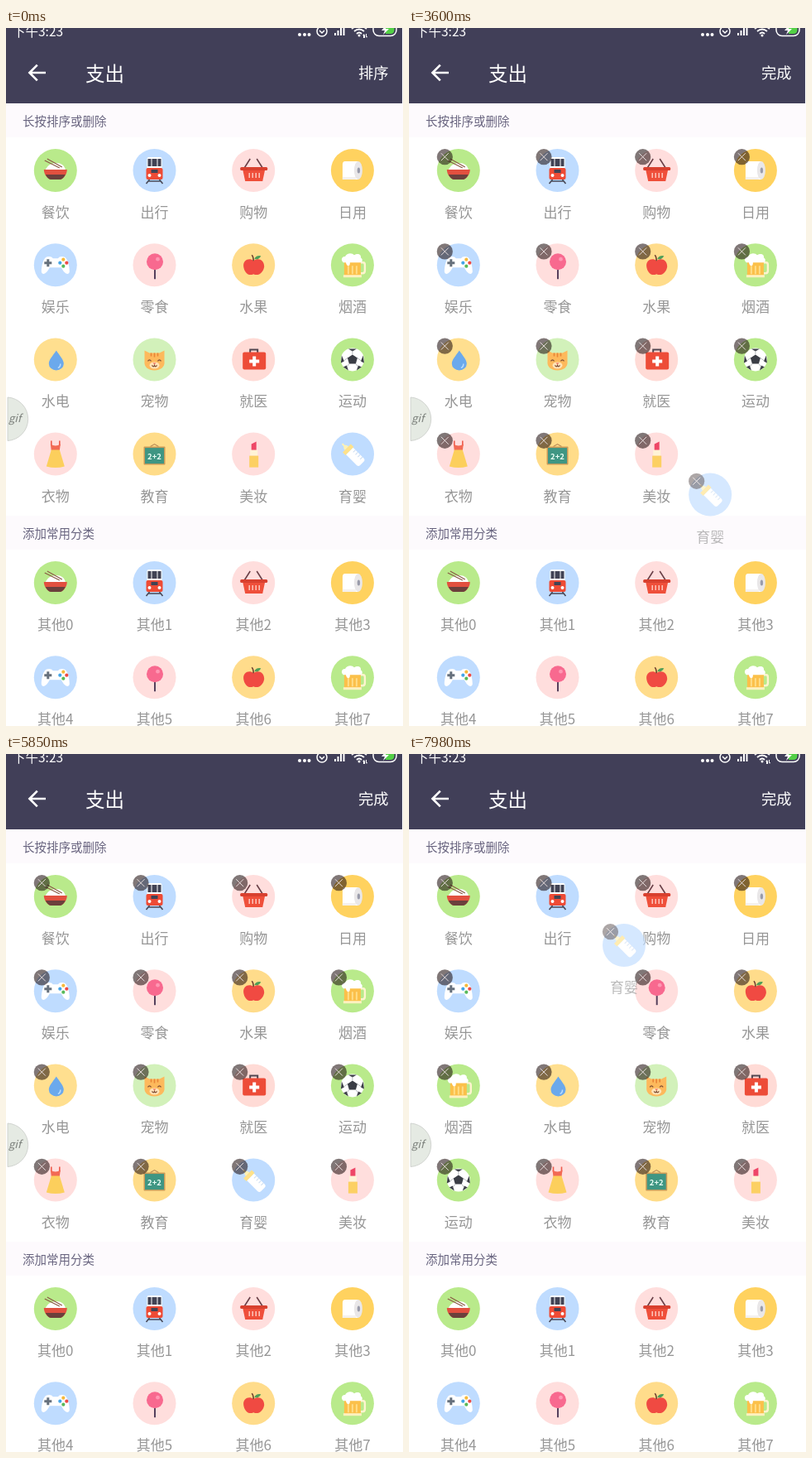
Write an HTML page that moves like this. It is 480 by 843 pixels and loops after 8000 ms.

```html
<!DOCTYPE html>
<html lang="zh-CN">
<head>
<meta charset="utf-8">
<title>支出分类</title>
<style>
html, body { margin: 0; width: 100%; height: 100%; overflow: hidden; background: #fff; }
svg { display: block; width: 100%; height: 100%; }
text { font-family: "Noto Sans CJK SC", "Noto Sans CJK", "Noto Sans", sans-serif; }
.label { font-size: 17px; fill: #969696; text-anchor: middle; }
.head { font-size: 14.5px; fill: #68647f; }
.bar { fill: #fff; }
</style>
</head>
<body>
<svg id="stage" viewBox="0 0 480 843" preserveAspectRatio="none"></svg>
<script>
const LOOP = 8000, SHIFT = 250, LAST = 15;

const GREEN = '#b9ea8b', BLUE = '#bfdcff', PINK = '#ffdedd', AMBER = '#ffdc8b';

// Each icon: disc colour and artwork centred on 0,0
const icons = {
  bowl: [GREEN, `
    <path d="M-12-1C-9-7-4-9 1-9 7-9 11-6 12-1Z" fill="#fff"/>
    <path d="M-13-12 5-3M-10-14 8-4" stroke="#8a5a44" stroke-width="1.2"/>
    <path d="M-14-1H14C14 5 9 11 5 11H-5C-9 11-14 5-14-1Z" fill="#e2503f"/>
    <path d="M-12 5H12Q9 11 5 11H-5Q-9 11-12 5Z" fill="#6b403c"/>`],
  train: [BLUE, `
    <path d="M-6 11-10 16M6 11 10 16M-7 13H7" stroke="#4a4a58" stroke-width="1.6"/>
    <rect x="-9" y="-16" width="18" height="16" rx="2" fill="#fff"/>
    <path d="M-8-14H-4V-5H-8ZM-3-14H3V-5H-3ZM4-14H8V-5H4Z" fill="#414354"/>
    <rect x="-10" y="-3" width="20" height="14" rx="2" fill="#ee4b35"/>
    <path d="M-4-1H4V3H-4Z" fill="#414354"/>
    <circle cx="-6" cy="6" r="2" fill="#fff"/><circle cx="6" cy="6" r="2" fill="#fff"/>`],
  basket: [PINK, `
    <path d="M-11-3-4-14M11-3 4-14" stroke="#6a4048" stroke-width="1.6"/>
    <path d="M-13-1H14L11 13H-10Z" fill="#ef4f3a"/>
    <rect x="-16" y="-4" width="33" height="4" rx="1.5" fill="#d8402f"/>
    <path d="M-5 3V9M-1 3V9M3 3V9M7 3V9" stroke="#ffd8d0" stroke-width="1.3"/>`],
  roll: ['#ffd25f', `
    <path d="M-9-11H7V11H-12V-7Q-12-11-9-11Z" fill="#fff"/>
    <path d="M-12 8V11H4V8Z" fill="#f4f1ee"/>
    <ellipse cx="7" cy="0" rx="5" ry="11" fill="#e9e7e8"/>
    <ellipse cx="7.5" cy="0" rx="1.7" ry="3.6" fill="#9a9cab"/>`],
  pad: [BLUE, `
    <path d="M-10-10Q-5-11-3-8H3Q5-11 10-10C15-9 17 2 17 8 16 13 11 11 7 3H-7C-11 11-16 13-17 8-17 2-15-9-10-10Z" fill="#fff"/>
    <path d="M-9-7V2M-13.5-2.5H-4.5" stroke="#66707c" stroke-width="3"/>
    <circle cx="9.5" cy="-6.5" r="2.1" fill="#f6b93b"/><circle cx="5.5" cy="-2.5" r="2.1" fill="#43a5e8"/>
    <circle cx="13.5" cy="-2.5" r="2.1" fill="#ee4b45"/><circle cx="9.5" cy="1.5" r="2.1" fill="#58b95b"/>`],
  candy: [PINK, `
    <path d="M.5 4V17" stroke="#55405c" stroke-width="2"/>
    <circle cx=".5" cy="-4" r="10" fill="#f8698f"/>
    <circle cx="4" cy="-7" r="2.4" fill="#ff97b3"/>`],
  apple: [AMBER, `
    <path d="M0-5C-4-9-13-7-12 2-11 9-6 14 0 11 6 14 12 9 13 2 13-7 5-9 0-5Z" fill="#f04a42"/>
    <path d="M0-5Q0-10-2-12" fill="none" stroke="#704030" stroke-width="1.6"/>
    <path d="M1-7Q3-12 9-11 7-6 1-7Z" fill="#4f9e57"/>`],
  beer: [GREEN, `
    <path d="M10-3H13Q15-3 15 0V7Q15 10 12 10H10" fill="none" stroke="#fff4cf" stroke-width="2.4"/>
    <path d="M-10-5H10V13H-10Z" fill="#fbc04a"/>
    <path d="M-5 1V11M0 1V11M5 1V11" stroke="#ffdc85" stroke-width="2"/>
    <path d="M-11 12H11V15H-11Z" fill="#fff1c0"/>
    <path d="M-11-3C-15-6-12-11-9-10-7-15 0-15 2-12 7-15 11-12 10-9 14-6 11-2 8-3H-3Q-3 1-5 1T-8-3Z" fill="#fff"/>`],
  drop: ['#ffdf8f', `
    <path d="M1-11C5-5 10 0 10 5A9 8 0 0 1-8 5C-8 0-3-5 1-11Z" fill="#6ba9ec"/>
    <path d="M6 5Q6 9 3 10" fill="none" stroke="#b9dcff" stroke-width="1.5"/>`],
  cat: ['#d2f1ba', `
    <path d="M-12 2V-11L-6-8H6L12-11V2C13 9 7 13 0 13S-13 9-12 2Z" fill="#fdb95c"/>
    <path d="M0-8V-3M-4-8V-4M4-8V-4" stroke="#e88436" stroke-width="1.6"/>
    <ellipse cy="7" rx="6" ry="4" fill="#ffe3b8"/>
    <path d="M-8 2Q-6-1-4 2M4 2Q6-1 8 2M-3 7Q-1 10 0 7 1 10 3 7" fill="none" stroke="#7a4a33" stroke-width="1.2"/>
    <path d="M-2 4H2L0 6Z" fill="#ea6759"/>`],
  kit: ['#ffdbd6', `
    <path d="M-4-8V-12H5V-8" fill="none" stroke="#504650" stroke-width="2"/>
    <rect x="-13" y="-9" width="28" height="21" rx="2" fill="#ed4c38"/>
    <path d="M1-4V8M-5 2H7" stroke="#fff" stroke-width="4"/>`],
  ball: [GREEN, `
    <circle r="14" fill="#fff"/>
    <path d="M0-6 6-2 4 5H-4L-6-2ZM-5-13H5L0-10ZM13-5 14 4 10 2ZM-13-5-14 4-10 2ZM5 13 11 9 7 7ZM-5 13-11 9-7 7Z" fill="#3a3d45"/>
    <path d="M0-6V-11M6-2 11 2M4 5 7 9M-4 5-7 9M-6-2-11 2" stroke="#a4a7ad" stroke-width=".8"/>`],
  dress: [PINK, `
    <path d="M-5-16V-10M5-16V-10" stroke="#ee5a4c" stroke-width="1.6"/>
    <path d="M-6-12Q0-8 6-12L5-4H-5Z" fill="#f26a55"/>
    <path d="M-5-5H5L11 15Q0 18-11 15Z" fill="#fccf5c"/>`],
  board: ['#ffdc89', `
    <path d="M-5-9 0-12 5-9" fill="none" stroke="#b98a55" stroke-width="1.2"/>
    <rect x="-13" y="-9" width="26" height="22" rx="1" fill="#c99a58"/>
    <rect x="-11.5" y="-7.5" width="23" height="19" fill="#3f9683"/>
    <text y="6" font-size="9.5" font-weight="700" fill="#e9fff5" text-anchor="middle">2+2</text>`],
  lipstick: [PINK, `
    <path d="M-2.5-4V-12L3.5-15V-4Z" fill="#ee4767"/>
    <path d="M-4-5H5V2H-4Z" fill="#fff3d6"/>
    <path d="M-5 2H6V16H-5Z" fill="#fcd063"/>`],
  bottle: [BLUE, `
    <g transform="rotate(-45)">
      <path d="M-3-10Q-3-13-1-14V-17Q0-19 1-17V-14Q3-13 3-10Z" fill="#fff2b4"/>
      <path d="M-7-10H7V-5H-7Z" fill="#ffe28a"/>
      <path d="M-6-5H6V13Q6 16 3 16H-3Q-6 16-6 13Z" fill="#fff"/>
      <path d="M2-1H6M2 3H6M2 7H6M2 11H6" stroke="#cfdff2" stroke-width="1.1"/>
    </g>`]
};
const names = Object.keys(icons);
const labels = '餐饮 出行 购物 日用 娱乐 零食 水果 烟酒 水电 宠物 就医 运动 衣物 教育 美妆 育婴'.split(' ');

// Playback advances in short ticks: [start, tick length, tick count]
const spans = [[1400, 91.4, 7], [3400, 91.25, 8], [4220, 95.7, 8], [5090, 95, 8], [6450, 93.75, 8], [7300, 97.1, 7]];
// Free slot moves: [time, old slot, new slot]
const swaps = [[5450, 15, 14], [6990, 14, 10], [7267, 10, 5]];
// Times at which the network arrows blink off or on
const blinks = [2510, 3700, 4600, 5500];
// Finger path: [time, x, y]
const path = [
  [3310, 419, 514.6], [4130, 254, 662], [4600, 183, 757], [4700, 179, 757], [4889, 179, 711],
  [4985, 190, 657], [5600, 296, 522], [5800, 299.2, 514.6], [6480, 299.2, 514.6], [6640, 298, 500],
  [6990, 283, 400], [7200, 230, 270], [7300, 223, 232], [7590, 224, 205.5], [7979, 260, 231]
];

const slot = i => [59.8 + 119.7 * (i % 4), 172 + 114.2 * Math.floor(i / 4)];
const clamp = v => Math.max(0, Math.min(1, v));
const mix = (a, b, k) => a + (b - a) * k;
const ease = k => (1 - Math.cos(Math.PI * clamp(k))) / 2;
const at = ([x, y]) => `translate(${x.toFixed(2)} ${y.toFixed(2)})`;

const cell = (icon, label, extra = '') => `<circle r="26" fill="${icons[icon][0]}"/>${icons[icon][1]}${extra}
  <text class="label" y="57">${label}</text>`;
const badge = `<g class="badge" transform="translate(-16.5 -16.3)">
  <circle r="9.6" fill="#1c0d0d" fill-opacity=".56"/>
  <path d="M-4.5-4.5 4.5 4.5M4.5-4.5-4.5 4.5" stroke="#e6dcdc" stroke-width="1"/></g>`;
const section = (y, title) => `<rect y="${y}" width="480" height="41" fill="#fdfafd"/>
  <text class="head" x="20" y="${y + 26.8}">${title}</text>`;

const status = `
  <text class="bar" x="8" y="10" font-size="15.5">下午3:23</text>
  <g fill="#fff"><circle cx="355" cy="8" r="2"/><circle cx="361" cy="8" r="2"/><circle cx="366.5" cy="8" r="2"/>
    <path d="M397 6H399V9H397ZM400.5 3H402.5V9H400.5ZM404-1H406V9H404ZM407.5-5H409.5V9H407.5Z"/>
    <path id="net" d="M432 12V9H431L433 7 434 9V12ZM435 7H436V10H437L436 12 435 10Z"/></g>
  <g fill="none" stroke="#fff" stroke-width="1.5">
    <circle cx="382" cy="4" r="6"/><path d="M379 3 382 6 385 3"/>
    <path d="M418 1Q427-6 436 1M421 4Q427-1 433 4M424 7Q427 4 430 7" stroke-width="1.8"/>
    <rect x="444" y="-7" width="28" height="16.5" rx="7"/></g>
  <circle cx="427" cy="9" r="1.5" fill="#fff"/>
  <path d="M459-5H465Q469.5-5 469.5 0V2Q469.5 7 465 7H459Z" fill="#52cf45"/>
  <path d="M460-4 454 3H458L456 8 463 1H459Z" fill="#fff"/>`;

const stage = document.getElementById('stage');
stage.innerHTML = `
  <rect width="480" height="843" fill="#fff"/>
  <rect width="479" height="91" fill="#413f58"/>
  ${status}
  <path d="M48 54H29M37.8 44.6 28.4 54 37.8 63.4" fill="none" stroke="#fff" stroke-width="2.6"/>
  <text class="bar" x="96" y="63.5" font-size="23.5">支出</text>
  <circle id="ripple" cx="444.5" cy="54" r="26.5" fill="#fff"/>
  <text id="action" class="bar" x="426" y="61" font-size="18.3"></text>
  ${section(91, '长按排序或删除')}
  ${section(589, '添加常用分类')}
  ${names.slice(0, 8).map((n, i) => {
    const [x, y] = slot(i);
    return `<g transform="${at([x, y + 498])}">${cell(n, '其他' + i)}</g>`;
  }).join('')}
  ${names.map((n, i) => `<g class="item">${cell(n, labels[i], badge)}</g>`).join('')}
  <path d="M2 446A26.3 26.3 0 0 1 2 498.5Z" fill="#e5eae3" stroke="#c9ccc8" stroke-width=".8"/>
  <text x="3" y="476" font-size="13" font-style="italic" fill="#7c807c">gif</text>`;

const items = [...stage.querySelectorAll('.item')];
const badges = [...stage.querySelectorAll('.badge')];
const [net, ripple, action] = ['net', 'ripple', 'action'].map(id => document.getElementById(id));

function tick(t) {
  const span = spans.filter(s => s[0] <= t).pop();
  if (!span) return t;
  const [start, step, count] = span;
  const n = Math.floor((t - start) / step + 1e-6);
  return start + Math.min(n, count) * step;
}

function place(i, t) {
  let s = i, pos = slot(i);
  for (const [time, from, to] of swaps) {
    if (t < time || s < to || s >= from) continue;
    const k = ease((t - time) / SHIFT), next = slot(++s);
    pos = pos.map((v, j) => mix(v, next[j], k));
  }
  return pos;
}

function finger(t) {
  const n = path.findIndex(p => p[0] > t);
  if (n === 0) return path[0].slice(1);
  if (n < 0) return path[path.length - 1].slice(1);
  const a = path[n - 1], b = path[n], k = (t - a[0]) / (b[0] - a[0]);
  return [mix(a[1], b[1], k), mix(a[2], b[2], k)];
}

function draw(now) {
  const t = tick(now), editing = now >= 1000;
  action.textContent = editing ? '完成' : '排序';
  ripple.setAttribute('opacity', editing ? 0.2 * clamp((2040 - t) / 720) : 0);
  net.setAttribute('opacity', blinks.filter(b => b <= now).length % 2 ? 0 : 1);
  badges.forEach(b => b.setAttribute('visibility', editing ? 'visible' : 'hidden'));
  items.forEach((el, i) => el.setAttribute('transform', at(i === LAST ? finger(t) : place(i, t))));
  const held = now >= 3200 && t < 5800 || now >= 6450;
  items[LAST].setAttribute('opacity', held ? 0.65 : 1);
}

function frame() {
  draw(performance.now() % LOOP);
  requestAnimationFrame(frame);
}
frame();
</script>
</body>
</html>
```
